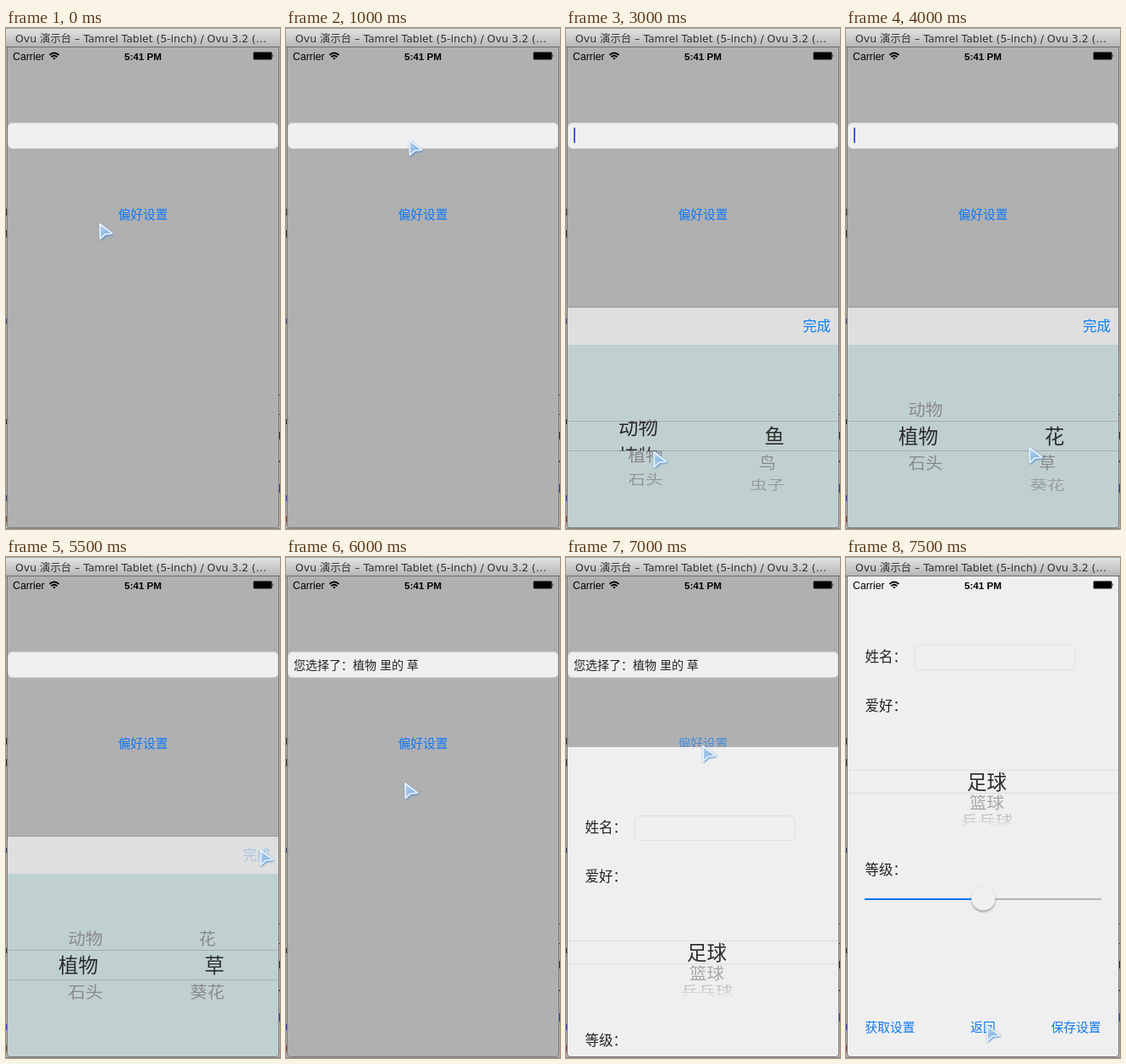
Recreate the animation shown at these times as an HTML page. Size 324 by 593 pixels, loop 8 s.

```html
<!DOCTYPE html>
<html lang="zh-CN">
<head>
<meta charset="utf-8">
<title>偏好设置</title>
<style>
html, body { margin: 0; width: 100%; height: 100%; overflow: hidden; background: #b0b0b0; }
svg { display: block; width: 324px; height: 593px; }
text { font-family: "Noto Sans CJK SC", "Noto Sans CJK", sans-serif; font-weight: 300; fill: #222; }
.title { font: 12.45px "DejaVu Sans", "Noto Sans CJK SC", sans-serif; fill: #333; }
.status { font: 12.3px "Liberation Sans", sans-serif; fill: #000; }
.clock { font: bold 11.7px "Liberation Sans", sans-serif; text-anchor: middle; fill: #000; }
.link { font-size: 14.8px; fill: #1279f0; text-anchor: middle; }
.label { font-size: 16.5px; }

/* Every part jumps between poses on a half-second beat (6.25%). */
.caret, .entry, .prefs, .done, .keyboard, .modal, .cursor, .wheel { animation: 8s step-end infinite; }
.caret { animation-name: caret; }
.entry { animation-name: entry; }
.prefs { animation-name: prefs; }
.done { animation-name: done; font-size: 16.5px; fill: #0a7dfa; }
.keyboard { animation-name: keyboard; }
.modal { animation-name: modal; }
.cursor { animation-name: cursor; }

/* Wheel rows sit on a drum; --i is the row, --pos the selected row. */
.wheel { --pos: 0; --step: 23deg; --radius: 80.5px; --pitch: 35px; --dim: #85838a; text-anchor: middle; }
.kinds { animation-name: kinds; }
.animals { animation-name: animals; }
.plants { animation-name: plants; }
.hobbies { --step: 22deg; --radius: 64px; --pitch: 27px; --dim: #a0a0a0; }
.drum text {
  --angle: calc((var(--i) - var(--pos)) * var(--step));
  font-size: 20.5px; fill: var(--dim); opacity: cos(var(--angle));
  transform: translateY(calc(var(--radius) * sin(var(--angle)))) scaleY(cos(var(--angle)));
}
.lens text {
  font-size: 23.5px; fill: #2c2c2c;
  transform: translateY(calc((var(--i) - var(--pos)) * var(--pitch)));
}

@keyframes caret {
  0%, 31.25%, 56.25%, 68.75%, 100% { opacity: 0; }
  25%, 37.5%, 62.5% { opacity: 1; }
}
@keyframes entry { 0% { opacity: 0; } 75%, 100% { opacity: 1; } }
@keyframes prefs { 0% { opacity: 1; } 87.5%, 100% { opacity: .65; } }
@keyframes done { 0%, 75%, 100% { opacity: 1; } 68.75% { opacity: .25; } }
@keyframes keyboard {
  0%, 75%, 100% { transform: translateY(270px); }
  25% { transform: translateY(34px); }
  31.25% { transform: none; }
}
@keyframes modal {
  0% { transform: translateY(570px); }
  87.5% { transform: translateY(202px); }
  93.75%, 100% { transform: none; }
}
@keyframes kinds {
  0% { --pos: 0; }
  37.5% { --pos: .3; }
  43.75% { --pos: .8; }
  50%, 100% { --pos: 1; }
}
@keyframes animals { 0% { opacity: 1; } 50%, 100% { opacity: 0; } }
@keyframes plants {
  0% { opacity: 0; --pos: 0; }
  50% { opacity: 1; --pos: 0; }
  62.5%, 100% { opacity: 1; --pos: 1; }
}
@keyframes cursor {
  0% { transform: translate(109px, 230px); }
  6.25% { transform: translate(154px, 219px); }
  12.5% { transform: translate(144px, 131px); }
  31.25% { transform: translate(102px, 510px); }
  37.5% { transform: translate(102px, 500px); }
  43.75% { transform: translate(103px, 480px); }
  50% { transform: translate(215px, 495px); }
  56.25% { transform: translate(237px, 510px); }
  62.5% { transform: translate(280px, 440px); }
  68.75% { transform: translate(299px, 345px); }
  75% { transform: translate(139px, 266px); }
  81.25% { transform: translate(160px, 225px); }
  87.5% { transform: translate(160px, 222px); }
  93.75%, 100% { transform: translate(165px, 553px); }
}
</style>
</head>
<body>
<svg viewBox="0 0 324 593">
  <defs>
    <linearGradient id="bar" x2="0" y2="1"><stop stop-color="#e6e6e6"/><stop offset="1" stop-color="#b4b4b4"/></linearGradient>
    <linearGradient id="ice" x2="1" y2="1"><stop stop-color="#b4d2ee"/><stop offset="1" stop-color="#72a8e0"/></linearGradient>
    <linearGradient id="fade" x2="0" y2="1"><stop stop-color="#efefef" stop-opacity="0"/><stop offset="1" stop-color="#efefef"/></linearGradient>
    <filter id="glow" x="-50%" y="-50%" width="200%" height="200%"><feDropShadow dx=".6" dy="1" stdDeviation="1.1" flood-color="#3f86d2"/></filter>
    <filter id="soft" x="-50%" y="-50%" width="200%" height="200%"><feDropShadow dx="0" dy="2" stdDeviation="1.3" flood-opacity=".35"/></filter>
    <clipPath id="screen"><path d="M2 23H322V587Q322 591 318 591H6Q2 591 2 587Z"/></clipPath>
    <clipPath id="band"><path d="M-80-17.5h160v35h-160z"/></clipPath>
    <clipPath id="around"><path d="M-80-100h160v82.5h-160zM-80 17.5h160v82.5h-160z"/></clipPath>
    <clipPath id="thinBand"><path d="M-80-13.5h160v27h-160z"/></clipPath>
    <clipPath id="thinAround"><path d="M-80 13.5h160v40h-160z"/></clipPath>
  </defs>

  <!-- window edges with slivers of the desktop -->
  <rect width="324" height="593" fill="#adadad"/>
  <path d="M0 592.5H324" stroke="#8c8c8c"/>
  <path d="M0 214h1v8h-1zM0 214h2v1h-2zM0 217h2v1h-2zM0 239h1v9h-1zM0 463h1v6h-1zM322 434h2v1h-2zM322 457h2v1h-2zM322 478h2v9h-2zM322 512h2v2h-2z" fill="#333"/>
  <path d="M0 344h1v6h-1zM0 553h2v7h-2zM322 540h2v10h-2z" fill="#2b3fa8"/>
  <path d="M0 578h1v7h-1z" fill="#a33a22"/>
  <path d="M1.5 22V587Q1.5 591.5 6 591.5H318Q322.5 591.5 322.5 587V22" fill="none" stroke="#7c7c7c"/>
  <rect width="324" height="23" fill="url(#bar)"/>
  <path d="M0 .5H324" stroke="#a0a0a0"/>
  <path d="M0 22.5H324" stroke="#6c6c6c"/>
  <text class="title" x="11" y="17">Ovu 演示台 – Tamrel Tablet (5-inch) / Ovu 3.2 (…</text>

  <g clip-path="url(#screen)">
    <rect x="2" y="23" width="320" height="568" fill="#b0b0b0"/>
    <rect x="2.5" y="112.5" width="319" height="30" rx="5" fill="#efefef" stroke="#dadada"/>
    <rect class="caret" x="9" y="118" width="2" height="18" fill="#4060c8"/>
    <text class="entry" x="9" y="133" font-size="14" word-spacing=".8">您选择了：植物 里的 草</text>
    <text class="link prefs" x="162" y="225.5">偏好设置</text>

    <g class="keyboard">
      <rect x="2" y="331" width="320" height="44" fill="#dfdfdf"/>
      <path d="M2 330.5H322" stroke="#9b9b9b"/>
      <text class="done" x="280" y="359.3">完成</text>
      <rect x="2" y="375" width="320" height="216" fill="#c0d0d0"/>
      <path d="M2 465.5H322M2 500.5H322" stroke="#a6acb0"/>
      <g class="wheel kinds" data-rows="动物 植物 石头" data-x="94" data-y="483" data-shift="-8.5"></g>
      <g class="wheel animals" data-rows="鱼 鸟 虫子" data-x="238" data-y="483" data-shift="8.5"></g>
      <g class="wheel plants" data-rows="花 草 葵花" data-x="238" data-y="483" data-shift="8.5"></g>
    </g>

    <g class="modal">
      <rect x="2" y="23" width="320" height="568" fill="#efefef"/>
      <text class="label" x="22.5" y="124">姓名：</text>
      <rect x="81.5" y="104.5" width="189" height="29" rx="5" fill="#f0f0f0" stroke="#dfdfdf"/>
      <text class="label" x="22.5" y="182">爱好：</text>
      <path d="M2 252.5H322M2 279.5H322" stroke="#dcdcdc"/>
      <g class="wheel hobbies" data-rows="足球 篮球 乒乓球" data-x="166.5" data-y="266.5" data-shift="0" data-thin="1"></g>
      <rect x="120" y="304" width="94" height="18" fill="url(#fade)"/>
      <text class="label" x="22.5" y="376">等级：</text>
      <path d="M162 405H302" stroke="#b3b3b3" stroke-width="2"/>
      <path d="M22 405H162" stroke="#0a74f0" stroke-width="2"/>
      <circle cx="162.5" cy="404" r="14" fill="#f0f0f0" stroke="#dadada" stroke-width=".5" filter="url(#soft)"/>
      <text class="link" x="52" y="561.5">获取设置</text>
      <text class="link" x="162" y="561.5">返回</text>
      <text class="link" x="272" y="561.5">保存设置</text>
    </g>

    <text class="status" x="8" y="38">Carrier</text>
    <g fill="none" stroke="#000" stroke-width="1.7">
      <path d="M51.5 32Q57 27 62.5 32M53.5 34.3Q57 31.2 60.5 34.3"/>
      <path d="M55.3 35.6Q57 34.4 58.7 35.6L57 37.6Z" fill="#000" stroke="none"/>
    </g>
    <text class="clock" x="162" y="38">5:41 PM</text>
    <rect x="292.5" y="28.5" width="22" height="9" rx="1.5" fill="none" stroke="#000" stroke-opacity=".5"/>
    <rect x="293" y="29" width="21" height="8" rx=".8"/>
    <path d="M315.5 31.3Q317 33 315.5 34.7Z"/>
  </g>

  <g class="cursor">
    <path d="M2 2L2.5 19.5L8 14.3L16.5 13.2Z" fill="url(#ice)" stroke="#eaf5ff" stroke-width="1.6" stroke-linejoin="round" filter="url(#glow)"/>
  </g>
</svg>
<script>
const strip = (kind, clip, rows, x, baseline) =>
  `<g class="${kind}" clip-path="url(#${clip})">` +
  rows.map((name, i) => `<text style="--i:${i}" x="${x}" y="${baseline}">${name}</text>`).join('') + '</g>';

for (const wheel of document.querySelectorAll('.wheel')) {
  const { rows, x, y, shift, thin } = wheel.dataset;
  const names = rows.split(' ');
  wheel.innerHTML = `<g transform="translate(${x} ${y})">` +
    strip('drum', thin ? 'thinAround' : 'around', names, 0, 7.8) +
    strip('lens', thin ? 'thinBand' : 'band', names, shift, 8.9) + '</g>';
}
</script>
</body>
</html>
```
